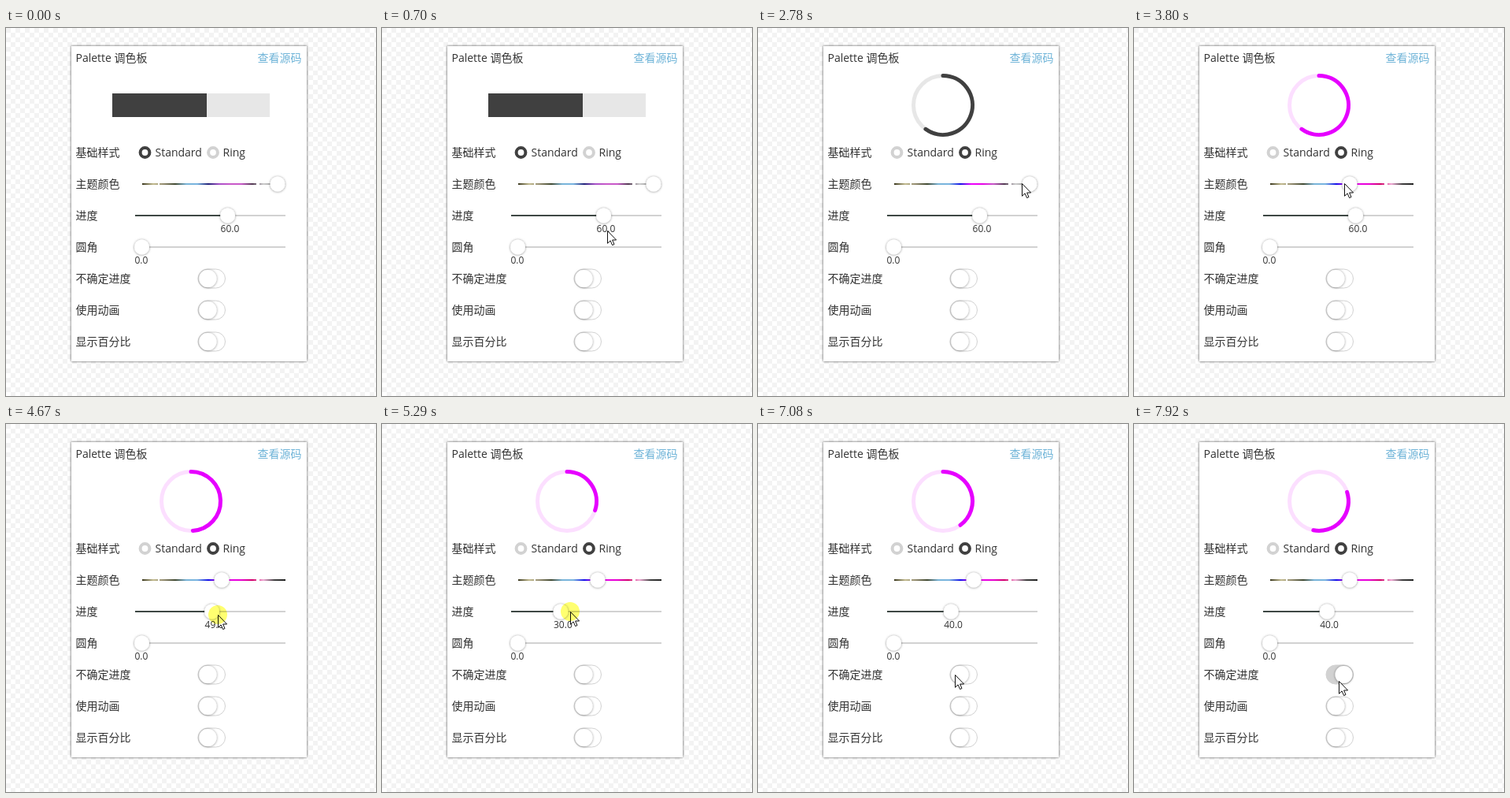
Write an HTML page that moves like this. It is 470 px wide and 467 px high and loops after 8 s.

```html
<!DOCTYPE html>
<html lang="zh">
<head>
<meta charset="utf-8">
<style>
html, body { margin: 0; width: 100%; height: 100%; overflow: hidden; background: #fff; }
svg { display: block; width: 470px; height: 467px; }
text { font: 14px "Open Sans", "Noto Sans CJK SC", "Noto Sans CJK", sans-serif; fill: #333; }
text.num { font-size: 12px; }
text.link { fill: #6fb4d8; }
.halo { mix-blend-mode: multiply; }
</style>
</head>
<body>
<svg id="stage" viewBox="0 0 470 467">
  <defs>
    <pattern id="checker" width="12" height="12" patternUnits="userSpaceOnUse">
      <path d="M0 0h6v6h-6zM6 6h6v6h-6z" fill="#f3f3f3"/>
    </pattern>
    <filter id="panelShadow" x="-10%" y="-10%" width="120%" height="120%">
      <feDropShadow dx="0" dy="0" stdDeviation="1.8" flood-color="#000" flood-opacity=".75"/>
    </filter>
    <filter id="knobShadow" x="-30%" y="-30%" width="160%" height="160%">
      <feDropShadow dx="0" dy="0.3" stdDeviation="1.4" flood-color="#000" flood-opacity=".5"/>
    </filter>
    <linearGradient id="hues"/>
  </defs>
  <rect width="470" height="467" fill="#fff"/>
  <rect width="470" height="467" fill="url(#checker)"/>
  <rect x="83" y="23" width="299" height="400" fill="#fff" filter="url(#panelShadow)"/>
</svg>
<script>
const LOOP = 8000, DARK = '#404040', GREY = '#d2d2d2';
const stage = document.getElementById('stage');

function add(tag, attrs, parent = stage) {
  const el = document.createElementNS('http://www.w3.org/2000/svg', tag);
  set(el, attrs);
  parent.append(el);
  return el;
}
function set(el, attrs) {
  for (const k in attrs) el.setAttribute(k, attrs[k]);
}
function label(x, y, str, cls = '') {
  const el = add('text', { x, y, class: cls });
  el.textContent = str;
  return el;
}
function show(el, on) { el.style.display = on ? '' : 'none'; }
function line(y, x = 164) {
  return add('rect', { x, y: y - 1, width: 355 - x, height: 2, fill: GREY });
}
function knob(cx, cy, r = 9.5) {
  return add('circle', { cx, cy, r, fill: '#fff', filter: 'url(#knobShadow)' });
}

label(88.5, 43, 'Palette 调色板');
label(319.5, 43, '查看源码', 'link');
['基础样式', '主题颜色', '进度', '圆角', '不确定进度', '使用动画', '显示百分比']
  .forEach((s, i) => label(88.5, 163 + 40 * i, s));

// preview: bar and ring
const bar = add('g', {});
add('rect', { x: 135, y: 83, width: 200, height: 30, fill: '#e7e7e7' }, bar);
add('rect', { x: 135, y: 83, width: 120, height: 30, fill: DARK }, bar);
const ring = add('g', { fill: 'none', 'stroke-width': 5, 'stroke-linecap': 'round' });
const rail = add('circle', { cx: 235, cy: 98, r: 37.5, 'stroke-opacity': .125 }, ring);
const arc = add('path', {}, ring);

const radios = [176.5, 263].map(cx => add('circle', { cx, cy: 158, r: 5.9, fill: '#fff', 'stroke-width': 4 }));
label(189.5, 163, 'Standard');
label(275.5, 163, 'Ring');

// evenly spaced hues; the right half is muted until the slider is used
const shared = ['#38361c', '#c4bc90', '#8f886c', '#404830', '#78b4d8', '#78b4e0'];
const muted = [...shared, '#202078', '#a850c8', '#c858c8', '#c858c8', '#503850', '#ccc', '#999', '#ddd'];
const vivid = [...shared, '#1010e8', '#f000ff', '#e800e8', '#e800d0', '#d00068', '#f0a8d4', '#404040', '#202020'];
const stops = vivid.map((c, i) =>
  add('stop', { offset: i / (vivid.length - 1) }, document.getElementById('hues')));
set(line(198, 173), { fill: 'url(#hues)' });
add('path', { d: 'M193 198h2M318 198h4', stroke: '#fff', 'stroke-width': 2 });
const hueKnob = knob(345, 198);

line(238);
const fill = line(238);
set(fill, { fill: '#3e4844' });
const valueKnob = knob(281, 238);
const valueText = label(273, 259, '', 'num');
line(278);
knob(172.5, 278);
label(163.5, 299, '0.0', 'num');

const switches = [318, 358, 398].map(cy => ({
  track: add('rect', { x: 244, y: cy - 12, width: 34.5, height: 24, rx: 12, fill: '#fff', stroke: GREY }),
  knob: knob(256.5, cy, 11)
}));

const cursor = add('path', {
  d: 'M.5 .5V16.3L4.1 12.9L6.6 18.6L9 17.5L6.6 12H11.6Z', fill: '#fff', stroke: '#111'
});
const halo = add('circle', { r: 12, fill: '#ffff70', class: 'halo' });

// glide from u to v between a and b, updated about every 77 ms
function glide(t, a, b, u, v) {
  const n = Math.round((b - a) / 77);
  const p = Math.floor(Math.min(1, Math.max(0, (t - a) / (b - a))) * n + 1e-6) / n;
  return u + (v - u) * p;
}
const within = (t, a, b) => t >= a && t < b;

// pointer stops: leave, arrive, x, y
const path = [
  [0, 0, 316, 398],
  [70, 1020, 265, 157], [1250, 2010, 281, 234], [2090, 2780, 335, 197],
  [3020, 3420, 267, 197], [3800, 4260, 287, 244], [4430, 5050, 239, 238],
  [5290, 5520, 254, 238], [5680, 6680, 173, 276], [6920, 7080, 250, 318],
  [7230, 7310, 262, 320], [7460, 7920, 260, 326]
];
function pointer(t) {
  const i = Math.max(1, path.filter(stop => t >= stop[0]).length - 1);
  const [, , x, y] = path[i - 1], [a, b, x2, y2] = path[i];
  return [glide(t, a, b, x, x2), glide(t, a, b, y, y2)].map(Math.round);
}

function polar(deg) {
  const a = deg * Math.PI / 180;
  return `${235 + 37.5 * Math.sin(a)} ${98 - 37.5 * Math.cos(a)}`;
}

function draw(t) {
  const [x, y] = pointer(t);
  show(cursor, t >= 70);
  show(halo, within(t, 1020, 1250) || within(t, 3020, 3800) || within(t, 4430, 5680) || within(t, 7460, 7600));
  set(cursor, { transform: `translate(${x} ${y})` });
  set(halo, { cx: x, cy: y });

  const ringMode = t >= 1250;
  show(bar, !ringMode);
  show(ring, ringMode);
  radios.forEach((r, i) => set(r, { stroke: (i === 1) === ringMode ? DARK : GREY }));

  stops.forEach((s, i) => {
    const reveal = Math.min(1250 + 760 * (i - 6), 3020);
    set(s, { 'stop-color': (t < reveal ? muted : vivid)[i] });
  });

  // theme colour goes grey, pink, then magenta
  const drag = glide(t, 3020, 3420, 0, 1);
  const color = drag ? `hsl(${330 - 36 * drag} 100% ${65 - 15 * drag}%)` : DARK;
  set(hueKnob, { cx: 345 - 71 * drag });

  const v = Math.round(glide(t, 4430, 5050, 60, 30) + glide(t, 5290, 5520, 0, 10));
  const kx = 172.4 + 1.82 * v;
  set(valueKnob, { cx: kx });
  set(fill, { width: kx - 164 });
  set(valueText, { x: kx - 9 });
  valueText.textContent = v.toFixed(1);

  const spin = glide(t, 7540, 7920, 0, 1);
  const from = 72 * spin, to = v * 3.6 + 47 * spin;
  set(rail, { stroke: color });
  set(arc, { stroke: color, d: `M${polar(from)}A37.5 37.5 0 ${+(to - from > 180)} 1 ${polar(to)}` });

  const on = glide(t, 7540, 7770, 0, 1), shade = 255 - 45 * on;
  set(switches[0].knob, { cx: 256.5 + 10 * on });
  set(switches[0].track, { fill: `rgb(${shade},${shade},${shade})` });
}

const start = performance.now();
function tick() {
  draw((performance.now() - start) % LOOP);
  requestAnimationFrame(tick);
}
tick();
</script>
</body>
</html>
```
